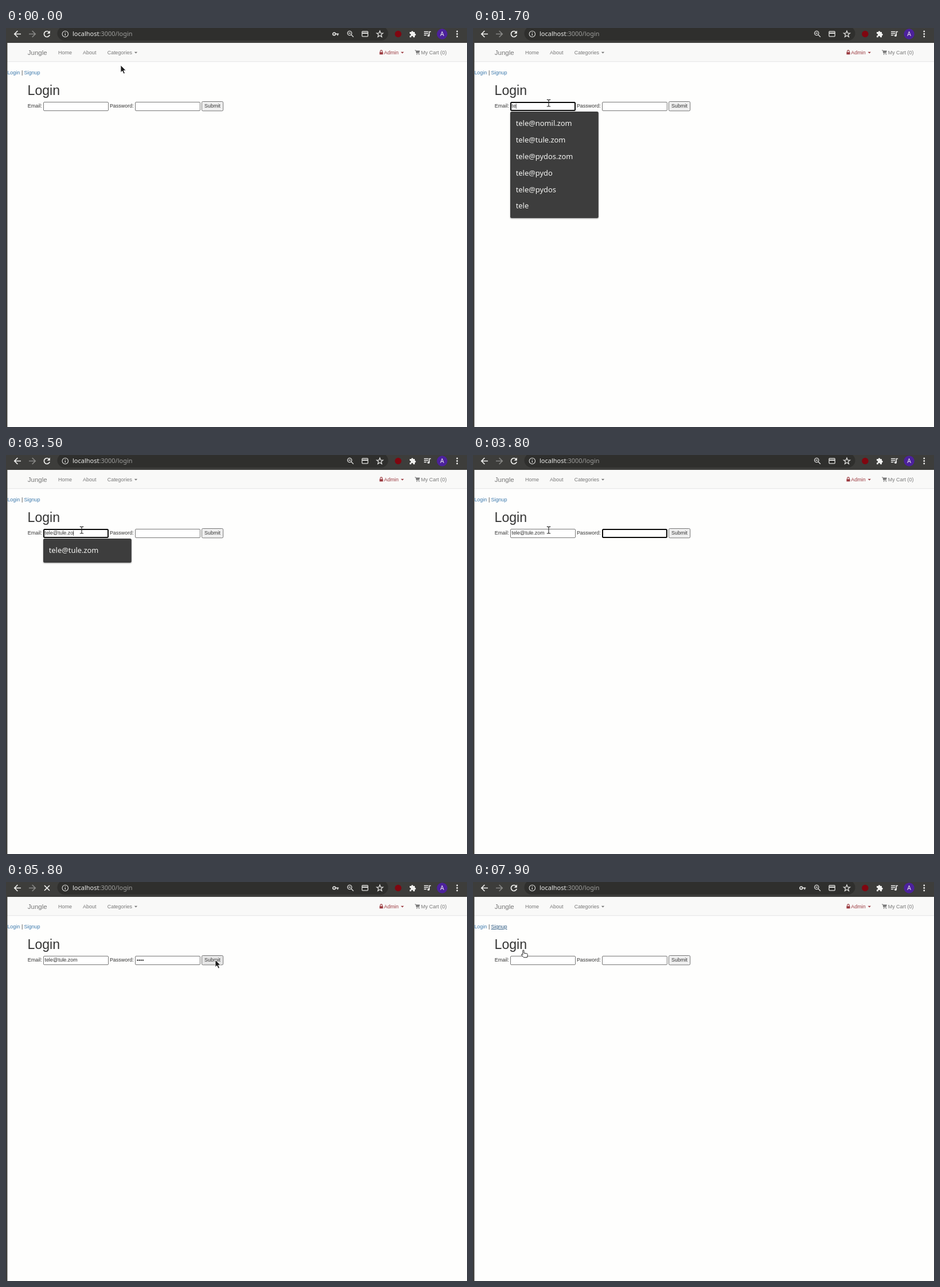
Write an HTML page that moves like this. It is 804 px wide and 697 px high and loops after 8 s.

```html
<!DOCTYPE html>
<html lang="en">
<head>
<meta charset="utf-8">
<title>Login form</title>
<style>
  html, body { margin: 0; width: 100%; height: 100%; overflow: hidden; background: #fefefd; }
  svg { display: block; width: 100%; height: 100%; }
  text { font: 8.96px "Liberation Sans", Arial, sans-serif; fill: #333; white-space: pre; }
  .ui text { font: 11px "Noto Sans", sans-serif; fill: #9c9c9a; }
  .ui text.host { fill: #ececea; }
  .ui text.initial { font-size: 10.5px; fill: #eee; text-anchor: middle; }
  .menu text { font: 500 12.9px "Noto Sans", sans-serif; fill: #f4f4f2; }
  .nav text { fill: #777; }
  .nav text.brand { font-size: 11.52px; }
  .nav text.admin { fill: #9c3b40; }
  text.title { font-size: 23.04px; }
  text.link { fill: #3a78ac; }
  text.link.hover { fill: #23527c; text-decoration: underline; }
  .line { fill: none; stroke: #dededc; stroke-width: 1.3; }
</style>
</head>
<body>
<svg viewBox="0 0 804 697" xmlns="http://www.w3.org/2000/svg">
  <defs>
    <filter id="shade" x="-10%" y="-10%" width="120%" height="125%">
      <feDropShadow dx="0" dy="1" stdDeviation="1.3" flood-color="#000" flood-opacity=".4"/>
    </filter>
  </defs>
  <rect width="804" height="697" fill="#fefefd"/>

  <g class="nav">
    <rect y="26" width="804" height="33" fill="#f9f9f8"/>
    <path d="M0 58.7H804" stroke="#e5e5e4"/>
    <text class="brand" x="37.8" y="46.8">Jungle</text>
    <text x="91" y="46">Home</text>
    <text x="134" y="46">About</text>
    <text x="176.7" y="46">Categories</text>
    <path d="M223.8 41.8h5.4l-2.7 2.8z" fill="#777"/>
    <path d="M651.5 42h6v4.3h-6zM652.8 42v-1.4a1.7 1.7 0 0 1 3.4 0V42" fill="#9c3b40"/>
    <path d="M652.8 42.2v-1.6a1.7 1.7 0 0 1 3.4 0v1.6" fill="#f9f9f8" stroke="#9c3b40" stroke-width="1.1"/>
    <text class="admin" x="659.3" y="46">Admin</text>
    <path d="M688.6 41.8h5.4l-2.7 2.8z" fill="#9c3b40"/>
    <path d="M713 39h1.8l1.2 5h5" fill="none" stroke="#777"/>
    <path d="M715 39.6h6.8l-.7 3.2-5.4.6z" fill="#777"/>
    <circle cx="716.6" cy="45.8" r=".9" fill="#777"/>
    <circle cx="720.4" cy="45.8" r=".9" fill="#777"/>
    <text x="723.7" y="46">My Cart (0)</text>
  </g>

  <text class="link" x="2.4" y="81">Login</text>
  <text x="27" y="81">|</text>
  <text class="link" id="signup" x="31.6" y="81">Signup</text>
  <text class="title" x="37.6" y="117.2">Login</text>
  <text x="37.8" y="139.4">Email:</text>
  <text x="180.9" y="139.4">Password:</text>

  <rect id="email" y="129.5" height="15" fill="#fff"/>
  <rect id="pass" y="129.5" height="15" fill="#fff"/>
  <text id="typed" x="67.4" y="139.4"></text>
  <path id="caret" d="M0 132.3v8.6" stroke="#222" stroke-width=".8"/>
  <g id="dots" fill="#222"></g>
  <rect id="button" x="341.5" y="128.5" width="37.2" height="16.3" rx="2" stroke="#777"/>
  <text x="346" y="139.4">Submit</text>

  <g class="menu" id="menu">
    <rect id="panel" x="65" y="146" width="153.8" rx="2.5" fill="#3d3d3c" filter="url(#shade)"/>
    <g id="rows"></g>
  </g>

  <path d="M0 0H804V26H2.4V697H0z" fill="#3d3d3b"/>
  <rect x="89.5" y="-3" width="577" height="25" rx="12.5" fill="#2f2f2d"/>
  <g class="ui">
    <path class="line" d="M26 10.5H15M20.3 5l-5.5 5.5 5.5 5.5" style="stroke:#f2f2f0;stroke-width:1.7"/>
    <path class="line" d="M40 10.5H51M45.7 5l5.5 5.5-5.5 5.5" style="stroke:#888886;stroke-width:1.7"/>
    <g id="reload">
      <path class="line" d="M75.2 7.2a5 5 0 1 0 1 4.8" style="stroke:#f2f2f0;stroke-width:1.7"/>
      <path d="M76.8 4.6v5.2h-5.2z" fill="#f2f2f0"/>
    </g>
    <path id="stop" class="line" d="M67 6l9 9m0-9l-9 9" style="stroke:#f2f2f0;stroke-width:1.7"/>
    <circle class="line" cx="103.3" cy="10.5" r="5.2" style="stroke-width:1.1"/>
    <path class="line" d="M103.3 9.7v3.6M103.3 7.2v1.3"/>
    <text x="116" y="14.4"><tspan fill="#ececea">localhost</tspan>:3000/login</text>
    <g id="key">
      <circle class="line" cx="572.3" cy="10.4" r="2.3" style="stroke-width:1.7"/>
      <path class="line" d="M574.6 10.4h5.7M578.4 10.4v2.8" style="stroke-width:1.8"/>
    </g>
    <circle class="line" cx="599.3" cy="9" r="3.7"/>
    <path class="line" d="M602 11.8l4 4M597.5 9h3.6"/>
    <rect class="line" x="621" y="6" width="10.2" height="8.8" rx="1"/>
    <path class="line" d="M621 9h10" style="stroke-width:2"/>
    <path class="line" id="star"/>
    <circle cx="683.9" cy="10.5" r="5.7" fill="#800610"/>
    <path d="M704 7h2.7a1.8 1.8 0 1 1 3.6 0h2.7v2.8a1.8 1.8 0 1 1 0 3.6v2.8h-2.9a1.7 1.7 0 1 0-3.3 0H704v-2.9a1.7 1.7 0 1 0 0-3.3z" fill="#f0f0ee"/>
    <path class="line" d="M729 6.4h7.6M729 9.5h7.6M729 12.6h4.4M738.3 13V6.4h2.8" style="stroke:#f0f0ee;stroke-width:1.5"/>
    <circle cx="736.9" cy="13.2" r="1.9" fill="#f0f0ee"/>
    <circle cx="760.6" cy="10.5" r="9.2" fill="#4c219c"/>
    <text class="initial" x="760.6" y="14.3">A</text>
    <g fill="#f0f0ee"><circle cx="786.8" cy="6" r="1.4"/><circle cx="786.8" cy="10.5" r="1.4"/><circle cx="786.8" cy="15" r="1.4"/></g>
  </g>

  <path id="arrow" d="M0 0v12.6l2.9-2.6 2.3 5 2.2-1-2.2-4.8h3.9z" fill="#1d1d1d" stroke="#fff" stroke-width=".8"/>
  <path id="beam" d="M-3.2-5.6h2.2l1 .8 1-.8h2.2M0-4.8v10M-3.2 6h2.2l1-.8 1 .8h2.2" fill="none" stroke="#222" stroke-width="1.1"/>
  <path id="hand" d="M-2.2-5c0-1.6 2.1-1.6 2.1 0v4.2l5 .9c1.3.3 1.6 1 1.4 2.2l-.9 4.5h-6L-4.5 2.6c-.8-1.3.6-2 1.4-1.2l.9.9z" fill="#fff" stroke="#222" stroke-width="1"/>
</svg>

<script>
const LOOP = 8000;
const $ = id => document.getElementById(id);
const show = (id, on) => $(id).style.display = on ? "" : "none";
const attrs = (id, map) => {
  for (const k in map) $(id).setAttribute(k, map[k]);
};

// Last entry of a [time, ...values] list that has begun
const at = (list, t) => list.filter(e => e[0] <= t).pop();

const known = ["tele@nomil.zom", "tele@tule.zom", "tele@pydos.zom", "tele@pydo", "tele@pydos"];
const recent = ["7@7.zom", "e@o.zom", "ul@ul.zom", "4@4.zom", "oluv@oluv.zom", "d@d.zom"];
const address = known[1];

const menus = [
  [0, []],
  [800, recent],
  [1500, [...known.slice(0, 3), "t@u.zom", ...known.slice(3)]],
  [1700, [...known, "tele"]],
  [2500, known],
  [2700, [address]],
  [3700, []]
];

// Number of characters in the email field
const typing = [
  [0, 0], [1500, 1], [1700, 2], [1800, 3], [2400, 4], [2500, 5], [2700, 6],
  [2900, 8], [3200, 9], [3400, 11], [3500, 12], [3600, 13], [6500, 0]
];

const pointer = [
  [0, "arrow", 200, 65], [300, "arrow", 199.5, 66], [500, "arrow", 195, 72],
  [600, "arrow", 172, 96], [700, "beam", 140, 125], [800, "beam", 132, 131],
  [5100, "arrow", 277, 149], [5200, "arrow", 300, 159], [5300, "arrow", 334, 157],
  [5400, "arrow", 358, 143], [5500, "arrow", 365, 137], [5700, "arrow", 365, 136],
  [6500, "arrow", 366, 138], [6700, "arrow", 371, 142], [6900, "arrow", 369, 145],
  [7100, "arrow", 368, 152], [7300, "arrow", 362, 155], [7400, "arrow", 341, 154],
  [7500, "arrow", 302, 151], [7600, "arrow", 246, 147], [7700, "arrow", 196, 140],
  [7800, "beam", 140, 134], [7900, "hand", 89, 125]
];

const starPoints = Array.from({ length: 10 }, (_, i) => {
  const r = i % 2 ? 2.5 : 5.8, a = i * Math.PI / 5;
  return `${652 + r * Math.sin(a)} ${10.8 - r * Math.cos(a)}`;
});
$("star").setAttribute("d", `M${starPoints.join("L")}Z`);

function field(id, x, focused) {
  const inset = focused ? .5 : 0;
  attrs(id, {
    x: x + inset, y: 129.5 + inset, width: 113 - 2 * inset, height: 15 - 2 * inset,
    rx: 1.5, stroke: focused ? "#080808" : "#777", "stroke-width": focused ? 2 : 1
  });
}

let shown;
function drawMenu(items) {
  if (items === shown) return;
  shown = items;
  show("menu", items.length);
  $("panel").setAttribute("height", 42 + 28.8 * Math.max(0, items.length - 1));
  $("rows").innerHTML = items.map((s, i) => `<text x="74.7" y="${171.4 + 28.8 * i}">${s}</text>`).join("");
}

function draw(t) {
  const onEmail = t >= 800 && t < 3700;
  field("email", 65.5, onEmail);
  field("pass", 225.5, t >= 3700 && t < 5500);

  $("typed").textContent = address.slice(0, at(typing, t)[1]);
  show("caret", onEmail);
  if (onEmail) {
    const x = 67.7 + $("typed").getComputedTextLength();
    $("caret").setAttribute("transform", `translate(${x})`);
  }

  const count = t < 6500 ? Math.max(0, Math.min(4, Math.floor((t - 4100) / 100))) : 0;
  $("dots").innerHTML = Array.from({ length: count }, (_, i) =>
    `<circle cx="${229.4 + 3.15 * i}" cy="136.6" r="1.2"/>`).join("");

  $("button").setAttribute("fill", t >= 5400 && t < 6900 ? "#e5e5e5" : "#efefef");
  drawMenu(at(menus, t)[1]);
  show("key", t < 1500 || t >= 4200);

  const loading = t >= 5700 && t < 6600;
  show("stop", loading);
  show("reload", !loading);
  $("signup").classList.toggle("hover", t >= 7900);

  const [, shape, x, y] = at(pointer, t);
  for (const id of ["arrow", "beam", "hand"]) show(id, id === shape);
  $(shape).setAttribute("transform", `translate(${x} ${y})`);
}

const start = performance.now();
function tick() {
  draw((performance.now() - start) % LOOP);
  requestAnimationFrame(tick);
}
tick();
</script>
</body>
</html>
```
